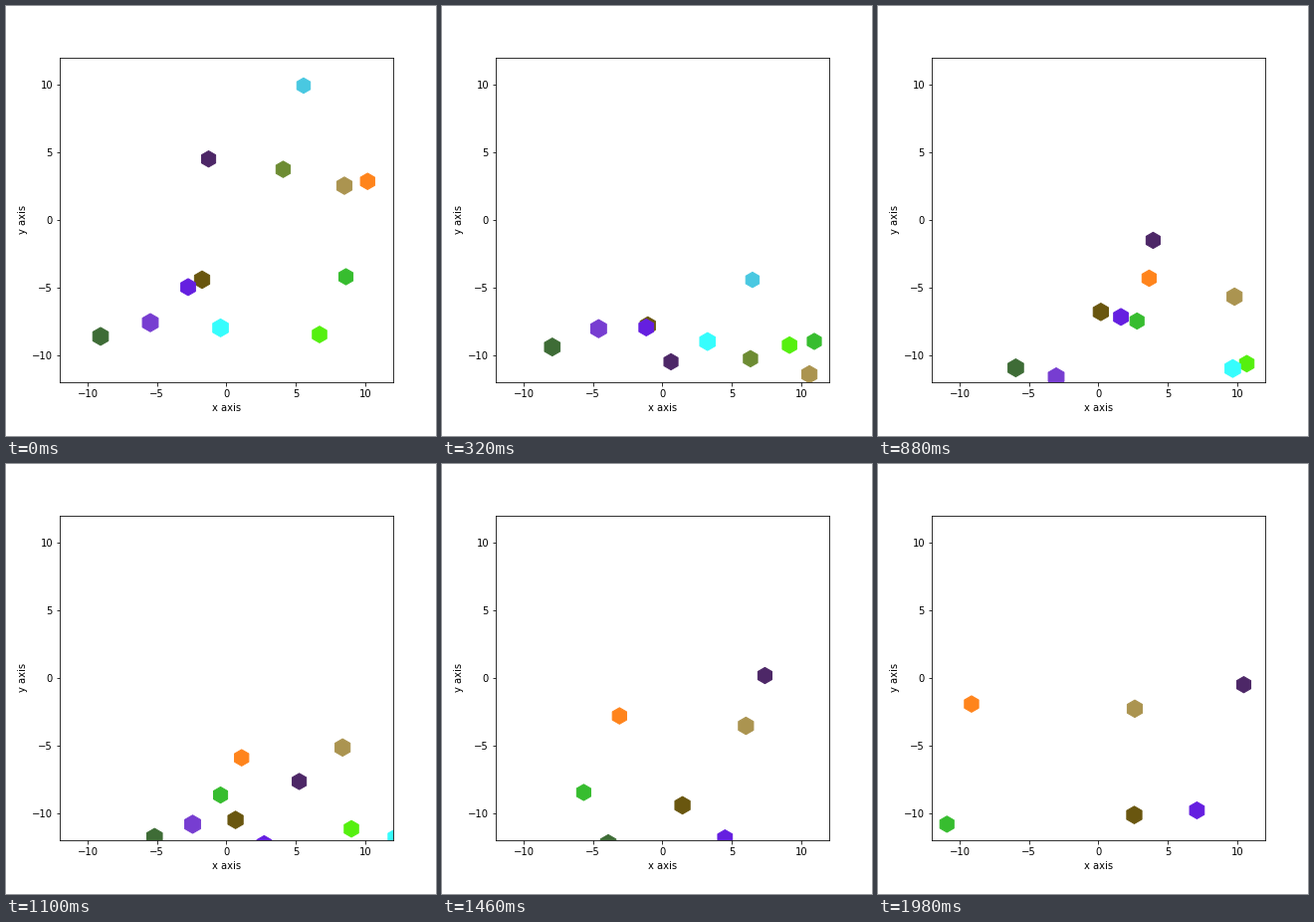
A matplotlib script for the animation above (2000 ms loop, 432 by 432 pixels).

```python
import numpy as np
import matplotlib.pyplot as plt
from matplotlib.animation import FuncAnimation

FRAMES = 100
GRAVITY = 0.098
WALL = 12

# x, y, vx, vy, marker size, colour
BALLS = [
    (5.56, 9.93, 0.058, -0.0645, 15.5, "#49c8e1"),
    (10.17, 2.85, 0.2326, -0.171, 16.5, "#ff841c"),
    (4.09, 3.74, 0.141, -0.042, 16.5, "#6d8c33"),
    (-1.28, 4.505, 0.1187, -0.104, 16.3, "#4d2767"),
    (8.50, 2.53, 0.1306, -0.254, 17.5, "#ab9450"),
    (8.61, -4.20, 0.2913, -0.1075, 16.3, "#37bd2f"),
    (6.71, -8.47, 0.153, -0.057, 16.7, "#55f00f"),
    (-0.42, -7.98, 0.2295, -0.016, 18.0, "#36fdfd"),
    (-9.06, -8.61, 0.0707, -0.013, 18.0, "#3e6c36"),
    (-5.477, -7.595, 0.0554, -0.268, 18.3, "#773dd1"),
    (-1.75, -4.42, 0.0438, -0.140, 17.6, "#69560f"),
    (-2.753, -4.965, 0.0995, -0.073, 17.0, "#651fe0"),
]


def track(x, y, vx, vy):
    """Euler steps; the velocity flips whenever the ball is past a wall."""
    path = [(x, y)]
    for _ in range(FRAMES - 1):
        vy -= GRAVITY
        x += vx
        y += vy
        if abs(x) > WALL:
            vx = -vx
        if abs(y) > WALL:
            vy = -vy
        path.append((x, y))
    return path


paths = np.array([track(*ball[:4]) for ball in BALLS])

fig, ax = plt.subplots(figsize=(6, 6), dpi=72)
fig.subplots_adjust(left=0.125, right=0.9, bottom=0.125, top=0.88)
ax.set(xlim=(-WALL, WALL), ylim=(-WALL, WALL), xlabel="x axis", ylabel="y axis")
ax.set_xticks(range(-10, 11, 5))
ax.set_yticks(range(-10, 11, 5))

dots = ax.scatter(
    paths[:, 0, 0],
    paths[:, 0, 1],
    s=[ball[4] ** 2 for ball in BALLS],
    c=[ball[5] for ball in BALLS],
    marker="h",
    linewidths=1,
)


def update(i):
    dots.set_offsets(paths[:, i])
    return (dots,)


anim = FuncAnimation(
    fig, update, frames=FRAMES, init_func=lambda: update(0),
    interval=20, repeat=True, repeat_delay=0,
)
plt.show()
```
